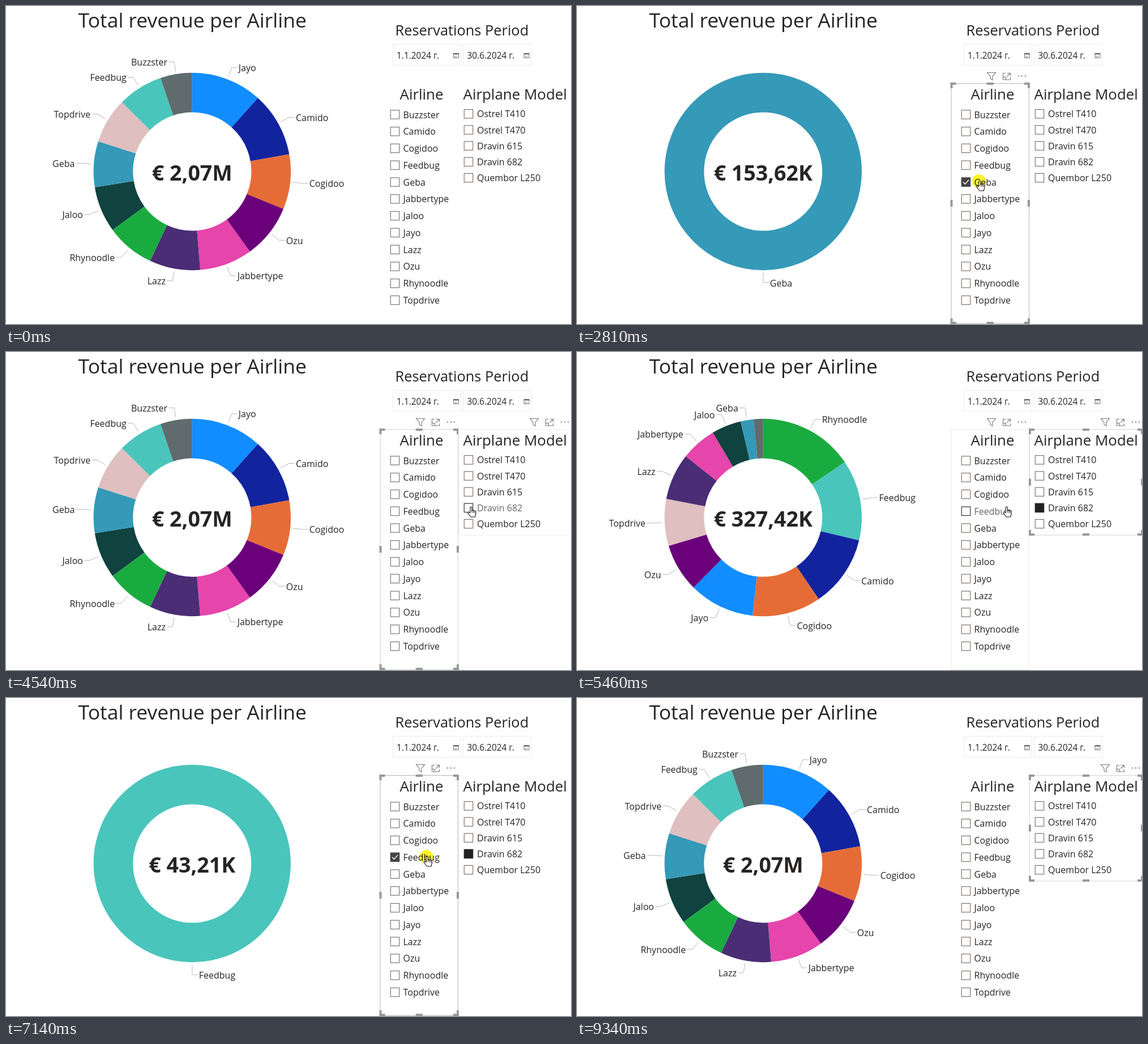
These frames come from a looping animation (998 by 561 pixels, 9.61 s). An HTML page:

```html
<!DOCTYPE html>
<html lang="en">
<head>
<meta charset="utf-8">
<title>Revenue dashboard</title>
<style>
  html, body { margin: 0; width: 100%; height: 100%; overflow: hidden; background: #fff; }
  svg { display: block; width: 100%; height: 100%; font-family: "Open Sans", "Noto Sans", sans-serif; }
  text { fill: #252423; white-space: pre; }
  .click { fill: #fff32a; mix-blend-mode: multiply; }
</style>
</head>
<body>
<svg id="stage" viewBox="0 0 998 561"></svg>
<script>
const LOOP = 9610, STEP = LOOP / 144;
const stage = document.getElementById('stage');

const colors = {
  Jayo: '#118dff', Camido: '#12239e', Cogidoo: '#e66c37', Ozu: '#6b007b',
  Jabbertype: '#e645ab', Lazz: '#4a2d75', Rhynoodle: '#1aab40', Jaloo: '#10423f',
  Geba: '#3599b8', Topdrive: '#dfbfbf', Feedbug: '#4ac5bb', Buzzster: '#5f6b6d'
};

// Each slice is [airline, end angle in degrees clockwise from the top].
const charts = {
  all: { total: '€ 2,07M', slices: [
    ['Jayo', 41.8], ['Camido', 79.9], ['Cogidoo', 112.3], ['Ozu', 144.2],
    ['Jabbertype', 175.3], ['Lazz', 205.2], ['Rhynoodle', 233.8], ['Jaloo', 260.8],
    ['Geba', 287.8], ['Topdrive', 314.6], ['Feedbug', 341.3], ['Buzzster', 360]] },
  model: { total: '€ 327,42K', slices: [
    ['Rhynoodle', 55.9], ['Feedbug', 103.4], ['Camido', 145.7], ['Cogidoo', 186.2],
    ['Jayo', 224.9], ['Ozu', 253.3], ['Topdrive', 280.9], ['Lazz', 308.3],
    ['Jabbertype', 329.3], ['Jaloo', 346.8], ['Geba', 354.4], ['Buzzster', 360]] },
  geba: { total: '€ 153,62K', slices: [['Geba', 360]] },
  feedbug: { total: '€ 43,21K', slices: [['Feedbug', 360]] }
};

const panels = {
  airline: {
    title: 'Airline', titleX: 695.5, left: 661, right: 798.5, bottom: 560, icons: 732,
    boxX: 687, labelX: 701.5, rowY: 191.5, rowGap: 29.77, tick: true,
    rows: Object.keys(colors).sort()
  },
  model: {
    title: 'Airplane Model', titleX: 807.5, left: 799.5, right: 998.5, bottom: 323, icons: 933,
    boxX: 817, labelX: 832, rowY: 190.3, rowGap: 28.2, tick: false,
    rows: ['Ostrel T410', 'Ostrel T470', 'Dravin 615', 'Dravin 682', 'Quembor L250']
  }
};
const TOP = 136;

// Timelines: [start time, value], each value holds until the next entry.
const chartTrack = [[0, 'all'], [1810, 'geba'], [2940, 'all'], [4680, 'model'],
  [6210, 'feedbug'], [7270, 'model'], [8600, 'all']];
const focusTrack = [[0, ''], [1740, 'airline'], [4610, 'model'], [6140, 'airline'], [8600, 'model']];
const checkTracks = {
  airline: [[0, ''], [1740, 'Geba'], [2880, ''], [6140, 'Feedbug'], [7270, '']],
  model: [[0, ''], [4610, 'Dravin 682'], [8600, '']]
};
const clicks = [[1410, 1540], [2810, 2880], [4270, 4410], [5940, 6140], [7140, 7270], [8340, 8420]];
const tips = [[4000, 4270], [8150, 8340]];
const path = [[810, 945, 425], [1270, 711.5, 308.5], [3150, 711.5, 308.5], [3340, 769, 292],
  [3630, 821.5, 273.5], [5140, 821.5, 273.5], [5460, 760, 273], [5800, 744, 279.5],
  [7280, 744, 279.5], [7680, 827, 280.5], [8940, 827, 280.5], [9340, 972, 545]];

const valueAt = (track, t) => track.filter(([start]) => start <= t).pop()[1];
const within = (spans, t) => spans.some(([a, b]) => t >= a && t < b);

function cursorAt(t) {
  if (t < 810 || t >= 9340) return null;
  const time = Math.min(9340, Math.max(810, Math.floor((t + 20) / STEP) * STEP + 10));
  const i = Math.max(1, path.findIndex(p => p[0] >= time));
  const [a, b] = [path[i - 1], path[i]];
  const k = (time - a[0]) / (b[0] - a[0]);
  return { x: a[1] + (b[1] - a[1]) * k, y: a[2] + (b[2] - a[2]) * k };
}

const inPanel = (p, c) => !!c && c.x >= p.left && c.x < p.right && c.y > TOP && c.y < p.bottom;
const rowAt = (p, c) => inPanel(p, c) ? p.rows[Math.round((c.y - p.rowY) / p.rowGap)] : undefined;

const text = (x, y, size, str, extra = '') =>
  `<text x="${x}" y="${y}" font-size="${size}" ${extra}>${str}</text>`;
const rect = (x, y, w, h, extra) => `<rect x="${x}" y="${y}" width="${w}" height="${h}" ${extra}/>`;
const line = (d, color, width = 1) =>
  `<path d="${d}" fill="none" stroke="${color}" stroke-width="${width}"/>`;

const CX = 328.8, CY = 292, OUTER = 174.2, INNER = 104.5;
const polar = (r, deg) => {
  const a = deg * Math.PI / 180;
  return [CX + r * Math.sin(a), CY - r * Math.cos(a)];
};

function slice(from, to, color) {
  if (to - from === 360) {
    const r = (OUTER + INNER) / 2;
    return `<circle cx="${CX}" cy="${CY}" r="${r}" fill="none" stroke="${color}" stroke-width="${OUTER - INNER}"/>`;
  }
  const large = to - from > 180 ? 1 : 0;
  return `<path fill="${color}" d="M${polar(OUTER, from)}A${OUTER} ${OUTER} 0 ${large} 1 ${polar(OUTER, to)}` +
    `L${polar(INNER, to)}A${INNER} ${INNER} 0 ${large} 0 ${polar(INNER, from)}Z"/>`;
}

function sliceLabel(name, mid) {
  const side = mid <= 180 ? 1 : -1;
  const [x, y] = polar(196, mid);
  return line(`M${polar(179, mid)}L${x} ${y}h${side * 9.5}`, '#b8b8b8') +
    text(x + side * 12, y + 6.5, 16, name, side < 0 ? 'text-anchor="end"' : '');
}

function donut({ total, slices }) {
  let from = 0, out = '';
  for (const [name, to] of slices) {
    out += slice(from, to, colors[name]);
    if (to - from > 6) out += sliceLabel(name, (from + to) / 2);
    from = to;
  }
  return out + text(CX, 308, 37.6, total, 'text-anchor="middle" font-weight="700"');
}

function dateBox(x, str) {
  return rect(x + .5, 67.5, 120, 37, 'fill="#fff" stroke="#eaeaea"') + text(x + 7, 92.5, 15.4, str) +
    rect(x + 107.5, 83.5, 9, 8, 'fill="#fff" stroke="#777"') +
    rect(x + 107.5, 83.5, 9, 2, 'fill="#666"') +
    line(`M${x + 109} 88.5h5.5M${x + 109} 90h4`, '#8aa39a', .8);
}

function headerIcons(x) {
  const dots = [48.5, 54.5, 60.5].map(d => `<circle cx="${x + d - .5}" cy="123.5" r="1.1" fill="#666"/>`).join('');
  return line(`M${x - 7.5} 117.5h15l-5.5 6.5v6.5l-4 -2.5v-4z`, '#777', 1.1) +
    line(`M${x + 25} 118.5h-4.5v11.5h13v-4M${x + 28} 118.5h5.5v5M${x + 33.5} 118.5l-6 6M${x + 20.5} 125.5h5v4.5`, '#777', 1.1) + dots;
}

function outline({ left, right, bottom }, focused, hovered) {
  const w = right - left, h = bottom - TOP, mx = (left + right) / 2, my = (TOP + bottom) / 2;
  const color = focused ? (hovered ? '#b5b5b5' : '#d4d4d4') : '#ececec';
  let out = rect(left, TOP + .5, w, h - .5, `fill="none" stroke="${color}"`);
  if (!focused) return out;
  const l = left + .5, r = right - .5, t = TOP + 1, b = bottom - 1;
  return out + line(
    `M${l} ${t + 8}V${t}h8M${r - 8} ${t}H${r}v8M${l} ${b - 8}V${b}h8M${r - 8} ${b}H${r}v-8` +
    `M${mx - 6} ${t}h12M${mx - 6} ${b}h12M${l} ${my - 6}v12M${r} ${my - 6}v12`, '#999', 4);
}

function row(p, name, i, checked, dark, gray) {
  const y = p.rowY + i * p.rowGap, x = p.boxX;
  const fill = checked ? (dark ? '#444' : '#212121') : '#fff';
  const stroke = checked ? fill : dark ? '#333' : '#81756f';
  let out = rect(x - 7.7, y - 7.7, 15.4, 15.4, `fill="${fill}" stroke="${stroke}" stroke-width="1.2"`);
  if (checked && p.tick) out += line(`M${x - 5} ${y}l3.5 3.7l6.5 -7.5`, '#fff', 1.4);
  return out + text(p.labelX, y + 6, 16, name, gray ? 'style="fill:#666"' : '');
}

function panel(key, t, cursor, lagged) {
  const p = panels[key], focused = valueAt(focusTrack, t) === key, hovered = inPanel(p, cursor);
  const checked = valueAt(checkTracks[key], t), hoverRow = rowAt(p, lagged);
  let out = focused || hovered ? outline(p, focused, hovered) + headerIcons(p.icons) : '';
  out += text(p.titleX, 165, 25.9, p.title);
  p.rows.forEach((name, i) => {
    const dark = name === hoverRow, on = name === checked;
    out += row(p, name, i, on, dark, dark && !on && rowAt(p, cursor) === name);
  });
  return out;
}

const HAND = 'M-1.6 10V1.2a1.5 1.5 0 0 1 3 0V6.4a1.4 1.3 0 0 1 2.6 .4a1.3 1.3 0 0 1 2.4 .5' +
  'a1.1 1.2 0 0 1 2 .6V12L6.8 17.5H-.4L-5.4 11.2a1.4 1.4 0 0 1 2.2 -1.8Z';
const ARROW = 'M0 0V16l3.7 -3.4l2.5 5.6l2.4 -1l-2.5 -5.5h5Z';

function pointer({ x, y }, t) {
  const overPanel = Object.values(panels).some(p => inPanel(p, { x, y }));
  let out = '';
  if (within(clicks, t)) out += `<circle class="click" cx="${x - 1.5}" cy="${y + .5}" r="12"/>`;
  if (within(tips, t)) {
    out += rect(x + 7.5, y + 15, 73, 23, 'fill="#fff" stroke="#bbb"') + text(x + 13, y + 31, 12, 'Dravin 682');
  }
  return out + `<path transform="translate(${x} ${y})" d="${overPanel ? HAND : ARROW}" ` +
    'fill="#fff" stroke="#111" stroke-width="1.1" stroke-linejoin="round"/>' +
    (overPanel ? line(`M${x + 1.4} ${y + 6}v4M${x + 4} ${y + 7}v3.5M${x + 6.3} ${y + 8}v3`, '#111', .9) : '');
}

const fixed = text(127.5, 38, 35.5, 'Total revenue per Airline') +
  text(687.5, 52, 25.4, 'Reservations Period') +
  dateBox(683, '1.1.2024 г.') + dateBox(807.5, '30.6.2024 г.');

let shown = '';
function render(now) {
  const t = now % LOOP, cursor = cursorAt(t), lagged = cursorAt(t - STEP);
  const scene = fixed + donut(charts[valueAt(chartTrack, t)]) +
    panel('airline', t, cursor, lagged) + panel('model', t, cursor, lagged) +
    (cursor ? pointer(cursor, t) : '');
  if (scene !== shown) stage.innerHTML = shown = scene;
}

let start;
function tick(now) {
  start ??= now;
  render(Math.max(0, now - start));
  requestAnimationFrame(tick);
}
render(0);
requestAnimationFrame(tick);
</script>
</body>
</html>
```
